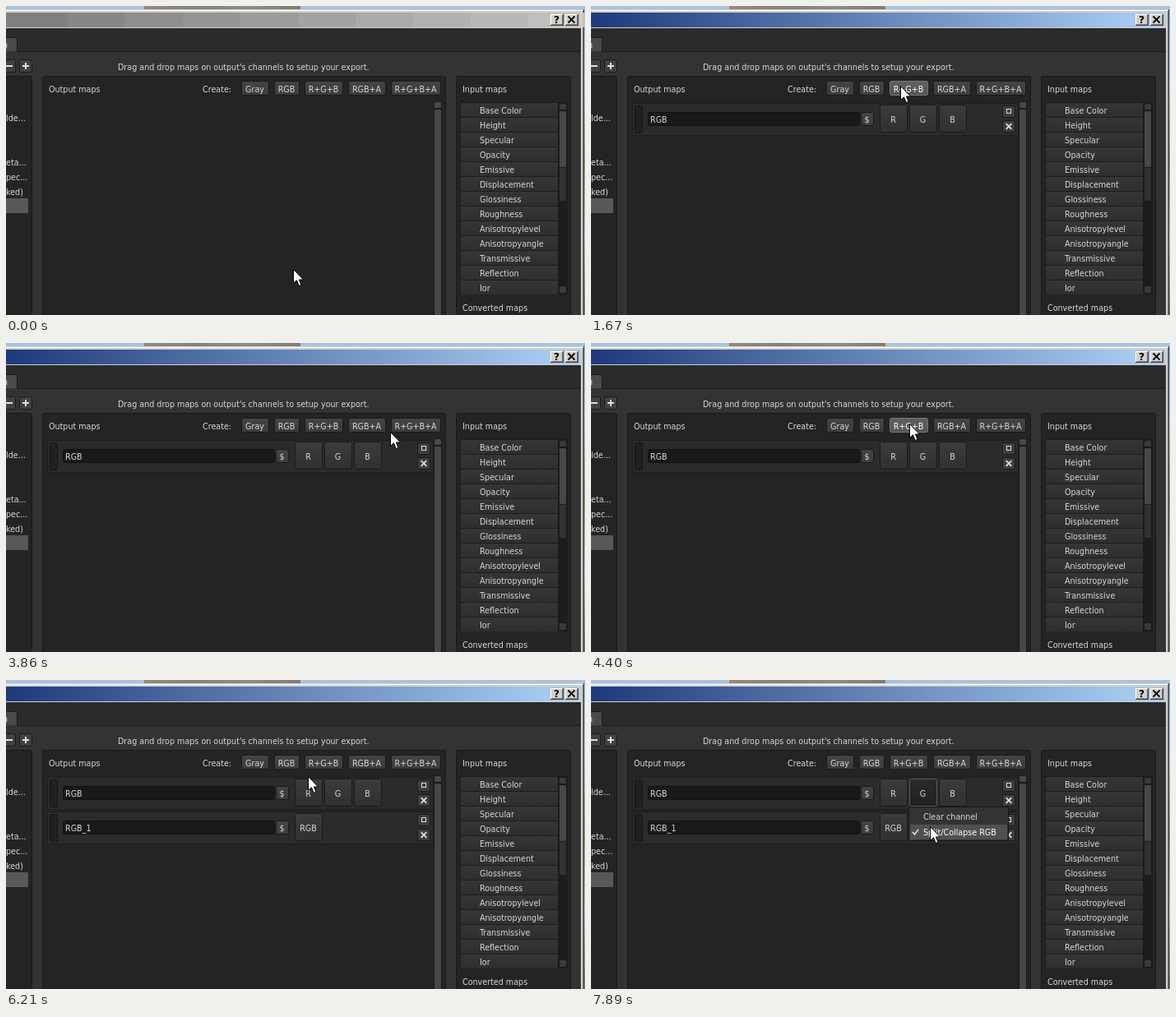
An HTML page with a canvas for the animation above (8000 ms loop, 704 by 376 pixels).

```html
<!DOCTYPE html>
<html lang="en">
<meta charset="utf-8">
<title>Export setup</title>
<style>
html, body { margin: 0; width: 100%; height: 100%; overflow: hidden; background: #333; }
canvas { display: block; }
</style>
<canvas id="stage" width="704" height="376"></canvas>
<script>
const ctx = document.getElementById('stage').getContext('2d');
const LOOP = 8000, STEP = 120, TEXT = '#d8d8d3', ICON = '#dedede';
const FOCUS = 1670, ADD_SECOND = 5350, RELEASE = 5510, MENU = 7160;

// Each leg moves the pointer to a new place in equal hard steps.
const home = { x: 350, y: 320 };
const legs = [
  { at: 620, steps: 1, x: 356, y: 225 },
  { at: 770, steps: 2, x: 356, y: 113 },
  { at: 1070, steps: 1, x: 366, y: 92 },
  { at: 1230, steps: 3, x: 377, y: 97 },
  { at: 2290, steps: 2, x: 366, y: 137 },
  { at: 2590, steps: 4, x: 384, y: 175 },
  { at: 3500, steps: 3, x: 489, y: 115 },
  { at: 3860, steps: 1, x: 468, y: 108 },
  { at: 3980, steps: 2, x: 441, y: 101 },
  { at: 4250, steps: 1, x: 388, y: 98 },
  { at: 4830, steps: 2, x: 331, y: 97 },
  { at: 6090, steps: 4, x: 404, y: 137 },
  { at: 7620, steps: 1, x: 404, y: 143 },
  { at: 7770, steps: 2, x: 413, y: 178 }
];
const inputs = ['Base Color', 'Height', 'Specular', 'Opacity', 'Emissive', 'Displacement',
  'Glossiness', 'Roughness', 'Anisotropylevel', 'Anisotropyangle', 'Transmissive', 'Reflection', 'Ior'];
const creatorWidths = { 'Gray': 34, 'RGB': 31, 'R+G+B': 47, 'RGB+A': 46, 'R+G+B+A': 61 };

function pointerAt(t) {
  let from = home;
  for (const leg of legs) {
    if (t < leg.at) break;
    const u = Math.min(1, (Math.floor((t - leg.at) / STEP) + 1) / leg.steps);
    from = {
      x: Math.round(from.x + (leg.x - from.x) * u),
      y: Math.round(from.y + (leg.y - from.y) * u)
    };
  }
  return from;
}

function rect(x, y, w, h, fill) {
  ctx.fillStyle = fill;
  ctx.fillRect(x, y, w, h);
}
function box(x, y, w, h, fill, border = '#191919', radius = 2) {
  ctx.beginPath();
  ctx.roundRect(x + .5, y + .5, w - 1, h - 1, radius);
  ctx.fillStyle = fill;
  ctx.fill();
  ctx.strokeStyle = border;
  ctx.lineWidth = 1;
  ctx.stroke();
}
function line(points, color, width) {
  ctx.beginPath();
  points.forEach(([x, y]) => ctx.lineTo(x, y));
  ctx.strokeStyle = color;
  ctx.lineWidth = width;
  ctx.stroke();
}
function cross(x, y, r, color) {
  line([[x - r, y - r], [x + r, y + r]], color, 1.8);
  line([[x + r, y - r], [x - r, y + r]], color, 1.8);
}
function text(str, x, middle, align = 'left', color = TEXT) {
  ctx.textAlign = align;
  ctx.fillStyle = color;
  ctx.fillText(str, x, middle + 4);
}
function ramp(x0, y0, x1, y1, ...colors) {
  const g = ctx.createLinearGradient(x0, y0, x1, y1);
  colors.forEach((c, i) => g.addColorStop(i / (colors.length - 1), c));
  return g;
}
function button(label, x, y, w, h, pointer, pressed, top = '#444', bottom = '#3c3c3c') {
  const hover = pointer.x > x && pointer.x < x + w && pointer.y >= y && pointer.y < y + h;
  const shade = (a, b) => ramp(0, y, 0, y + h, a, b);
  if (pressed) box(x, y, w, h, shade('#2a2a2a', '#202020'), '#595959');
  else if (hover) box(x, y, w, h, shade('#606060', '#545454'), '#777');
  else box(x, y, w, h, shade(top, bottom));
  text(label, x + w / 2 - .5, y + h / 2 + .5, 'center', hover ? '#fff' : TEXT);
}

function desktop() {
  rect(0, 0, 704, 376, '#a5c3e3');
  rect(168, 0, 190, 5, ramp(168, 0, 358, 0, '#908a80', '#85827d', '#8d8b87', '#807c75'));
  rect(703, 0, 1, 376, ramp(0, 0, 0, 376, '#8db8eb', '#a9c6e4', '#a98b68', '#b5bdc5', '#846a50'));
}
function windowFrame(active) {
  rect(0, 4, 703, 372, '#d4d0c8');
  rect(0, 5, 701, 1, '#fff');
  rect(701, 6, 1, 370, '#808080');
  rect(702, 4, 1, 372, '#404040');
  if (active) rect(0, 8, 698, 18, ramp(-100, 0, 660, 0, '#0a246a', '#a6caf0'));
  else for (let i = 0; i < 10; i++) {
    const v = 128 + i * 7;
    rect(i && i * 70 + 5, 8, 75, 18, `rgb(${v},${v},${v})`);
  }
  rect(698, 8, 3, 18, '#d4d0c8');
  for (const x of [662, 680]) {
    rect(x, 10, 16, 14, '#404040');
    rect(x, 10, 15, 13, '#fff');
    rect(x + 1, 11, 14, 12, '#808080');
    rect(x + 1, 11, 13, 11, '#d4d0c8');
  }
  ctx.font = 'bold 12px "DejaVu Sans", sans-serif';
  text('?', 669.5, 16.5, 'center', '#000');
  cross(687.5, 16.5, 4, '#000');
  ctx.font = '10.65px "DejaVu Sans Condensed", "Liberation Sans", sans-serif';
  rect(0, 27, 699, 349, '#333');
  rect(0, 27, 699, 28, '#2b2b2b');
  rect(0, 55, 699, 1, '#1d1d1d');
}
function leftSide() {
  box(-4, 38, 18, 20, '#4a4a4a');
  rect(0, 55, 14, 4, '#333');
  text('n', 2, 47, 'right');
  box(-5, 65, 17, 16, '#414141');
  box(16, 65, 16, 16, '#414141');
  rect(0, 72, 8, 2, ICON);
  rect(20, 72, 8, 2, ICON);
  rect(23, 69, 2, 8, ICON);
  box(-5, 85, 37, 300, '#242424');
  rect(0, 234, 27, 18, '#585858');
  text('lde...', 0, 136);
  ['eta...', 'pec...', 'ked)'].forEach((s, i) => text(s, 0, 190 + i * 18));
}
function rightSide() {
  box(547, 85, 140, 300, '#242424');
  text('Input maps', 555, 101);
  rect(552, 117, 131, 234, '#1c1c1c');
  inputs.forEach((name, i) => {
    const y = 118 + i * 18;
    rect(553, y, 118, 17, ramp(0, y, 0, y + 17, '#363636', '#2e2e2e'));
    text(name, 576, y + 9);
  });
  box(672, 118, 10, 9, '#3a3a3a');
  box(672, 127, 10, 111, '#323232');
  box(672, 127, 10, 70, '#474747');
  box(672, 340, 10, 10, '#3a3a3a');
  text('Converted maps', 555, 367);
}
function outputRow(y, name, channels, pointer, pressed) {
  box(50, y, 470, 40, '#2b2b2b', '#1d1d1d');
  box(53, y + 3, 10, 34, '#202020', '#151515');
  box(69, y + 11, 258, 17, '#191919', '#111');
  text(name, 72, y + 20);
  button('$', 328, y + 11, 16, 17, pointer);
  channels.forEach((c, i) =>
    button(c, 351 + i * 36, y + 2, 34, 34, pointer, pressed && i === 1, '#3c3c3c', '#303030'));
  box(500, y + 3, 16, 15, '#3e3e3e');
  box(500, y + 21, 16, 15, '#3e3e3e');
  ctx.strokeStyle = ICON;
  ctx.lineWidth = 1;
  ctx.strokeRect(505.5, y + 7.5, 5, 5);
  cross(508, y + 28.5, 3.3, ICON);
}
function menu(pointer) {
  box(386, 154, 122, 42, '#333', '#161616', 0);
  ['Clear channel', 'Split/Collapse RGB'].forEach((item, i) => {
    const y = 157 + i * 19, hover = pointer.y >= y && pointer.y < y + 19;
    if (hover) rect(388, y, 118, 18, '#505050');
    text(item, 404, y + 9, 'left', hover ? '#fff' : TEXT);
  });
  line([[391, 185], [393.5, 188], [398, 182]], ICON, 1.7);
}
function arrow({ x, y }) {
  const shape = new Path2D('M0 0V17L4 13.3 6.7 20 9.5 19 7 12.5H12Z');
  ctx.save();
  ctx.translate(x - .5, y + .5);
  ctx.fillStyle = '#fff';
  ctx.fill(shape);
  ctx.strokeStyle = '#000';
  ctx.lineWidth = 1;
  ctx.stroke(shape);
  ctx.restore();
}

function draw(t) {
  const pointer = pointerAt(t);
  desktop();
  windowFrame(t >= FOCUS);
  leftSide();
  rightSide();
  text("Drag and drop maps on output's channels to setup your export.", 136, 74);
  box(44, 85, 491, 300, '#242424');
  text('Output maps', 52, 101);
  text('Create:', 239, 101);
  let x = 286;
  for (const [label, width] of Object.entries(creatorWidths)) {
    const pressed = label === 'RGB' && t >= ADD_SECOND && t < RELEASE;
    button(label, x, 91, width, 18, pointer, pressed);
    x += width + 6;
  }
  rect(520, 116, 10, 260, '#1e1e1e');
  box(520, 116, 10, 9, '#484848');
  box(520, 125, 10, 260, '#474747');
  if (t >= FOCUS) outputRow(118, 'RGB', ['R', 'G', 'B'], pointer, t >= MENU);
  if (t >= ADD_SECOND) outputRow(160, 'RGB_1', ['RGB'], pointer, false);
  if (t >= MENU) menu(pointer);
  arrow(pointer);
}
function tick() {
  draw(performance.now() % LOOP);
  requestAnimationFrame(tick);
}
tick();
</script>
</html>
```
